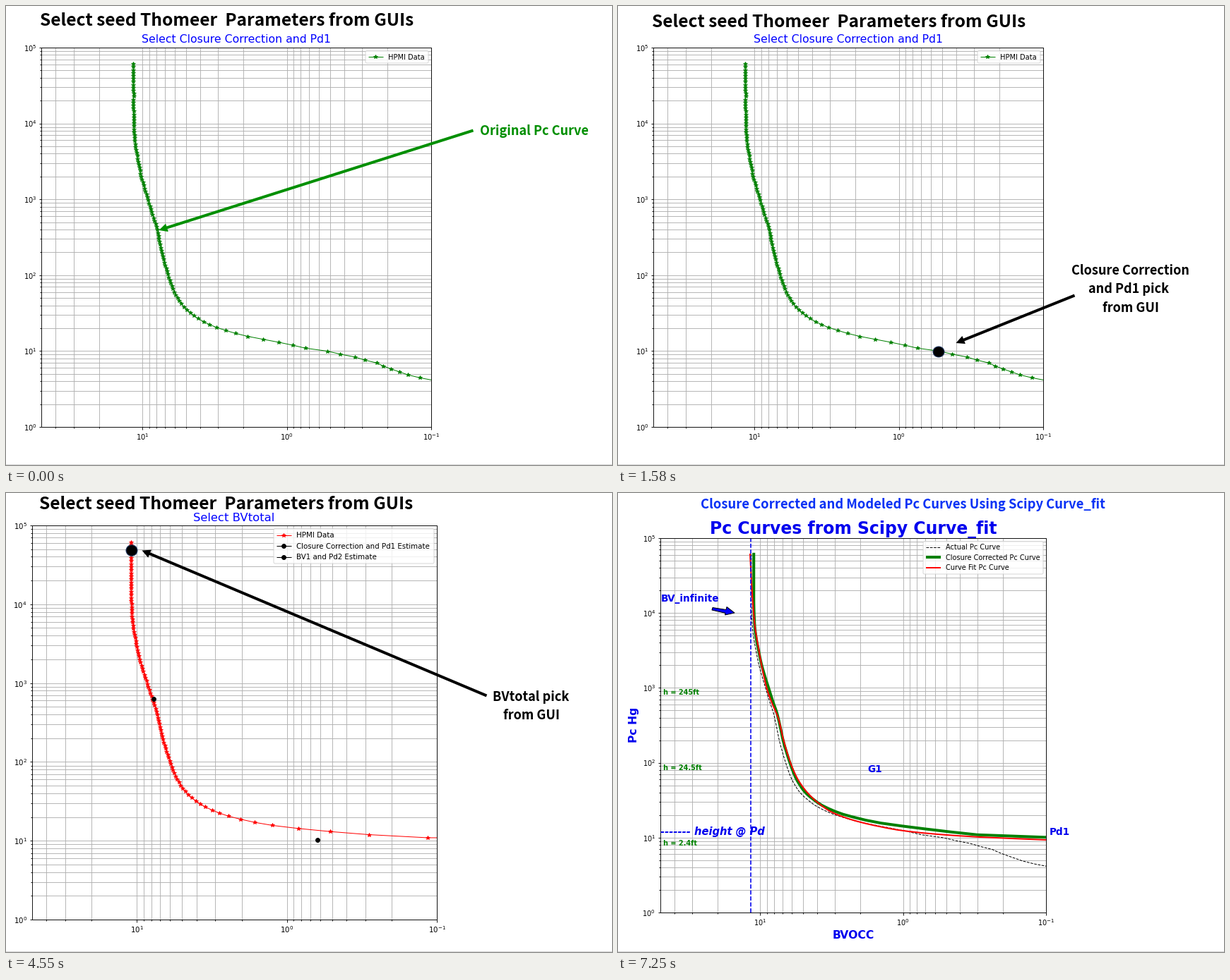
Recreate the animation shown at these times as a matplotlib script. Size 858 by 651 pixels, loop 8 s.

```python
import numpy as np
import matplotlib.pyplot as plt
from matplotlib.animation import FuncAnimation
from matplotlib.collections import LineCollection
from matplotlib.patches import Ellipse, FancyBboxPatch, Polygon, Rectangle

W, H, DPI = 858, 651, 64
PT = 72 / DPI  # points per pixel
STEP = 50
STARTS = [0, 500, 2300, 4550, 7250]
LOOP = 8000
GREEN, BLUE = "#008f00", "#0000ee"
SLIDE_FONT = "Noto Sans CJK JP"

# One axes in whole pixels, so thin straight lines snap to the named pixel
fig = plt.figure(figsize=(W / DPI, H / DPI), dpi=DPI, facecolor="white")
ax = fig.add_axes([0, 0, 1, 1])
ax.set_xlim(0, W)
ax.set_ylim(H, 0)
ax.axis("off")
ax.plot([0, W], [650, 650], color="#d6d6d6", lw=PT)


def hermite(t, knots, values):
    """Smooth curve through the given knots."""
    slope = np.gradient(values, knots)
    i = np.clip(np.searchsorted(knots, t) - 1, 0, len(knots) - 2)
    h = knots[i + 1] - knots[i]
    s = (t - knots[i]) / h
    return ((1 + 2 * s) * (1 - s) ** 2 * values[i]
            + s * (1 - s) ** 2 * h * slope[i]
            + s * s * (3 - 2 * s) * values[i + 1]
            + s * s * (s - 1) * h * slope[i + 1])


# Capillary pressure data, laid out on the first plot's pixel grid
UPPER = np.array([
    (82, 180.5), (120, 180.5), (160, 180.7), (175, 181.2), (190, 182.2),
    (205, 184.2), (220, 187), (240, 191), (255, 195), (275, 201), (295, 207),
    (310, 212), (322, 214.8), (335, 217.5), (350, 220.5), (365, 224.5),
    (380, 229), (395, 234), (405, 238), (415, 243.5), (422, 248)])
TAIL_X = [256, 261, 266, 272, 279.5, 288, 298, 311, 325, 342, 364, 386, 406,
          424, 455, 473, 494, 508, 525, 534, 545, 557, 569, 586, 608]
GAP = 4.2
tail_y = 430.7 + GAP * np.arange(len(TAIL_X))
knot_y = np.append(UPPER[:, 0], tail_y)
knot_x = np.append(UPPER[:, 1], TAIL_X)
data_y = 430.7 + GAP * np.arange(-83, len(TAIL_X))
PC = 10 ** ((597 - data_y) / 107.6)
BV = 10 ** ((602 - hermite(data_y, knot_y, knot_x)) / 204.4 - 1)


def corrected(closure):
    return np.maximum(BV - closure, 1e-9)


def text(x, y, s, size, color="black", ha="left", va="baseline", **kw):
    return ax.text(x, y, s, fontsize=size * PT, color=color, ha=ha, va=va,
                   zorder=6, **{"family": "DejaVu Sans", **kw})


def slide_text(x, y, s, size=18.1, color="black"):
    return text(x, y, s, size, color, "center", family=SLIDE_FONT,
                weight="bold")


def heading(x, y):
    return slide_text(x, y, "Select seed Thomeer  Parameters from GUIs", 24.5)


def arrow(tail, tip, color="black"):
    tail, tip = np.array(tail, float), np.array(tip, float)
    u = (tip - tail) / np.hypot(*(tip - tail))
    n = np.array([-u[1], u[0]])
    neck = tip - 12 * u
    shape = [tail + 2 * n, neck + 2 * n, neck + 6 * n, tip,
             neck - 6 * n, neck - 2 * n, tail - 2 * n]
    return ax.add_patch(Polygon(shape, fc=color, ec="none", zorder=7))


def pick(x, y, w, h):
    return ax.add_patch(Ellipse((x, y), w, h, fc="black", ec="#1f3864",
                                lw=PT, zorder=7))


class LogPlot:
    """Log-log axes, x running from 50 down to 0.1 and y from 1 to 1e5."""

    def __init__(self, right, decade, top, bottom):
        self.right, self.decade = right, decade
        self.top, self.bottom = top, bottom
        self.left = right - decade * np.log10(500)
        self.scale = (right - self.left) / 558
        self.artists = []
        self.frame = Rectangle((self.left, top), right - self.left,
                               bottom - top, fc="none", ec="black",
                               lw=0.9 * PT, zorder=4)
        self.add(ax.add_patch(self.frame))
        self.draw_grid()

    def add(self, *items):
        self.artists += items

    def px(self, bv):
        return self.right - self.decade * (np.log10(bv) + 1)

    def py(self, pc):
        return self.bottom - (self.bottom - self.top) / 5 * np.log10(pc)

    def lines(self, segments, color, z):
        self.add(ax.add_collection(LineCollection(
            segments, colors=color, linewidths=0.9 * PT, zorder=z)))

    def draw_grid(self):
        grid, ticks = [], []
        left, right = round(self.left), self.right
        for e in range(-1, 2):
            for m in range(1, 10):
                if m * 10.0 ** e < 50:
                    x = round(self.px(m * 10.0 ** e))
                    grid.append([(x, self.top), (x, self.bottom)])
                    size = 3.5 if m == 1 else 2
                    ticks.append([(x, self.bottom), (x, self.bottom + size)])
            self.label(self.px(10.0 ** e), self.bottom + 7, e, "center", "top")
        for e in range(6):
            for m in range(1, 10 if e < 5 else 2):
                y = round(self.py(m * 10.0 ** e))
                grid.append([(left, y), (right, y)])
                size = 3.5 if m == 1 else 2
                ticks.append([(left - size, y), (left, y)])
            self.label(self.left - 7, self.py(10.0 ** e), e, "right",
                       "center_baseline")
        self.lines(grid, "#b0b0b0", 1)
        self.lines(ticks, "black", 4)

    def label(self, x, y, e, ha, va):
        self.add(text(x, y, rf"$\mathdefault{{10^{{{e}}}}}$",
                      10 * self.scale, ha=ha, va=va))

    def curve(self, bv, pc, color, width=1.0, **style):
        line, = ax.plot(self.px(bv), self.py(pc), color=color, lw=width * PT,
                        zorder=3, **style)
        clip = Rectangle((self.left, self.top), self.right - self.left,
                         self.bottom - self.top, transform=ax.transData)
        line.set_clip_path(clip)
        self.add(line)

    def dot(self, x, y):
        self.add(*ax.plot([x], [y], "o", color="black", ms=6 * PT, zorder=3.5))

    def title(self, x, y, s):
        self.add(text(x, y, s, 16 * self.scale, "blue", "center"))

    def legend(self, box, rows):
        """Each row: centre y, label, colour, line width, line style, marker."""
        x0, y0, x1, y1 = box
        self.add(ax.add_patch(FancyBboxPatch(
            (x0 + 2, y0 + 2), x1 - x0 - 4, y1 - y0 - 4,
            boxstyle="round,pad=2,rounding_size=2", fc="white", ec="#cccccc",
            alpha=0.8, lw=PT, zorder=5)))
        a, b = x0 + 4, x0 + 24.5
        for y, name, color, width, style, marker in rows:
            self.add(*ax.plot([a, b], [y, y], color=color, lw=width * PT,
                              ls=style, zorder=6, solid_capstyle="butt"))
            if marker:
                self.add(*ax.plot([(a + b) / 2], [y], marker, color=color,
                                  ms=6 * PT, zorder=6))
            self.add(text(b + 7.5, y + 3.6, name, 10 * self.scale))


STAR = dict(marker="*", ms=6 * PT)
PD1 = "Closure Correction and Pd1 Estimate"


def closure_plot():
    p = LogPlot(602, 204.4, 59, 597)
    p.curve(BV, PC, "green", **STAR)
    p.title(325.5, 52.5, "Select Closure Correction and Pd1")
    p.legend((509, 63.5, 598, 81), [(72, "HPMI Data", "green", 1, "-", "*")])
    return p.artists


def closure_intro():
    return [heading(312.5, 28),
            slide_text(748, 183, "Original Pc Curve", color=GREEN),
            arrow((661.5, 176.5), (216.5, 318), GREEN)]


def closure_pick():
    return [heading(312.5, 30),
            slide_text(726, 381, "Closure Correction"),
            slide_text(723.5, 407, "and Pd1 pick"),
            slide_text(725.5, 433.5, "from GUI"),
            arrow((646.5, 410.5), (478.5, 478)),
            pick(454, 490.5, 16, 15)]


def bv1_scene():
    p = LogPlot(608, 207, 54, 599)
    p.curve(corrected(0.627), PC, "blue", **STAR)
    p.dot(443.5, 488.5)
    p.title(328, 47.5, "Select BV1 and Pd2")
    p.legend((383, 58.5, 604, 91.5),
             [(67, "HPMI Data", "blue", 1, "-", "*"),
              (82, PD1, "black", 1, "-", "o")])
    return p.artists + [
        heading(312, 28),
        slide_text(714, 194, "Pd2 and BV1"),
        slide_text(716.5, 220, "pick from GUI"),
        arrow((645.5, 201.5), (236.5, 322.5)),
        pick(224, 324.5, 16, 14.5)]


def bvtotal_scene():
    p = LogPlot(610, 212.4, 46, 605)
    p.curve(corrected(0.627), PC, "red", **STAR)
    p.dot(441, 491.5)
    p.dot(209, 291.5)
    p.title(322.5, 39.5, "Select BVtotal")
    p.legend((379, 50.5, 606, 100),
             [(59.5, "HPMI Data", "red", 1, "-", "*"),
              (75, PD1, "black", 1, "-", "o"),
              (90.5, "BV1 and Pd2 Estimate", "black", 1, "-", "o")])
    return p.artists + [
        heading(311.5, 23.3),
        slide_text(743.5, 295, "BVtotal pick"),
        slide_text(743.5, 321, "from GUI"),
        arrow((680.5, 287.5), (192.5, 81.5)),
        pick(178, 81.5, 16, 15.5)]


def fit_scene():
    p = LogPlot(606, 202.3, 64, 595)
    p.curve(BV, PC, "black", ls="--")
    p.curve(corrected(0.44), PC, "green", 4)
    fit = np.array([
        (87, 187), (120, 188.6), (160, 191.3), (190, 194), (215, 198),
        (240, 202.5), (262, 207), (280, 211.5), (298, 218), (318, 226.5),
        (345, 233), (370, 240), (390, 247), (410, 257), (427, 270),
        (440, 284), (456, 310), (466, 340), (473, 370), (479, 404),
        (483.8, 450), (487.7, 507), (492, 606)])
    y = np.linspace(87, 492, 200)
    p.add(*ax.plot(hermite(y, fit[:, 0], fit[:, 1]), y, color="red",
                   lw=2 * PT, zorder=3))
    p.add(*ax.plot([187.5] * 2, [595, 64], "--", color=BLUE, lw=1.6 * PT,
                   zorder=3))
    p.legend((432, 68.5, 602, 115),
             [(76.5, "Actual Pc Curve", "black", 1, "--", None),
              (91, "Closure Corrected Pc Curve", "green", 4, "-", None),
              (105.5, "Curve Fit Pc Curve", "red", 2, "-", None)])
    p.add(ax.add_patch(Polygon(
        [(134, 162.5), (133, 166), (152, 170.3), (151.5, 173), (165, 170),
         (154, 161.5), (153, 165.5)], fc="blue", ec="black", lw=PT, zorder=6)))
    bold = dict(weight="bold")
    for y, h in [(286.5, "245"), (393, "24.5"), (499.5, "2.4")]:
        p.add(text(64, y, f"h = {h}ft", 9.8, "green", **bold))
    return p.artists + [
        slide_text(403.5, 21.5, "Closure Corrected and Modeled Pc Curves "
                   "Using Scipy Curve_fit", 18.4, "#0a32f5"),
        text(333, 57.5, "Pc Curves from Scipy Curve_fit", 23.5, BLUE,
             "center", **bold),
        text(333.5, 631.5, "BVOCC", 15.6, BLUE, "center", **bold),
        text(22, 329, "Pc Hg", 15.6, BLUE, "center", "center", rotation=90,
             **bold),
        text(61, 154, "BV_infinite", 13.6, BLUE, **bold),
        text(60.5, 485, "------- height @ Pd", 14.7, BLUE, style="italic",
             **bold),
        text(353.5, 395.5, "G1", 13.6, BLUE, **bold),
        text(611, 485.3, "Pd1", 13.6, BLUE, **bold)]


base = closure_plot()
scenes = [base + closure_intro(), base + closure_pick(), bv1_scene(),
          bvtotal_scene(), fit_scene()]


def update(i):
    now = np.searchsorted(STARTS, i * STEP, side="right") - 1
    for scene in scenes:
        for artist in scene:
            artist.set_visible(False)
    for artist in scenes[now]:
        artist.set_visible(True)
    return []


anim = FuncAnimation(fig, update, frames=LOOP // STEP, interval=STEP,
                     init_func=lambda: update(0), repeat=True, repeat_delay=0)
plt.show()
```
